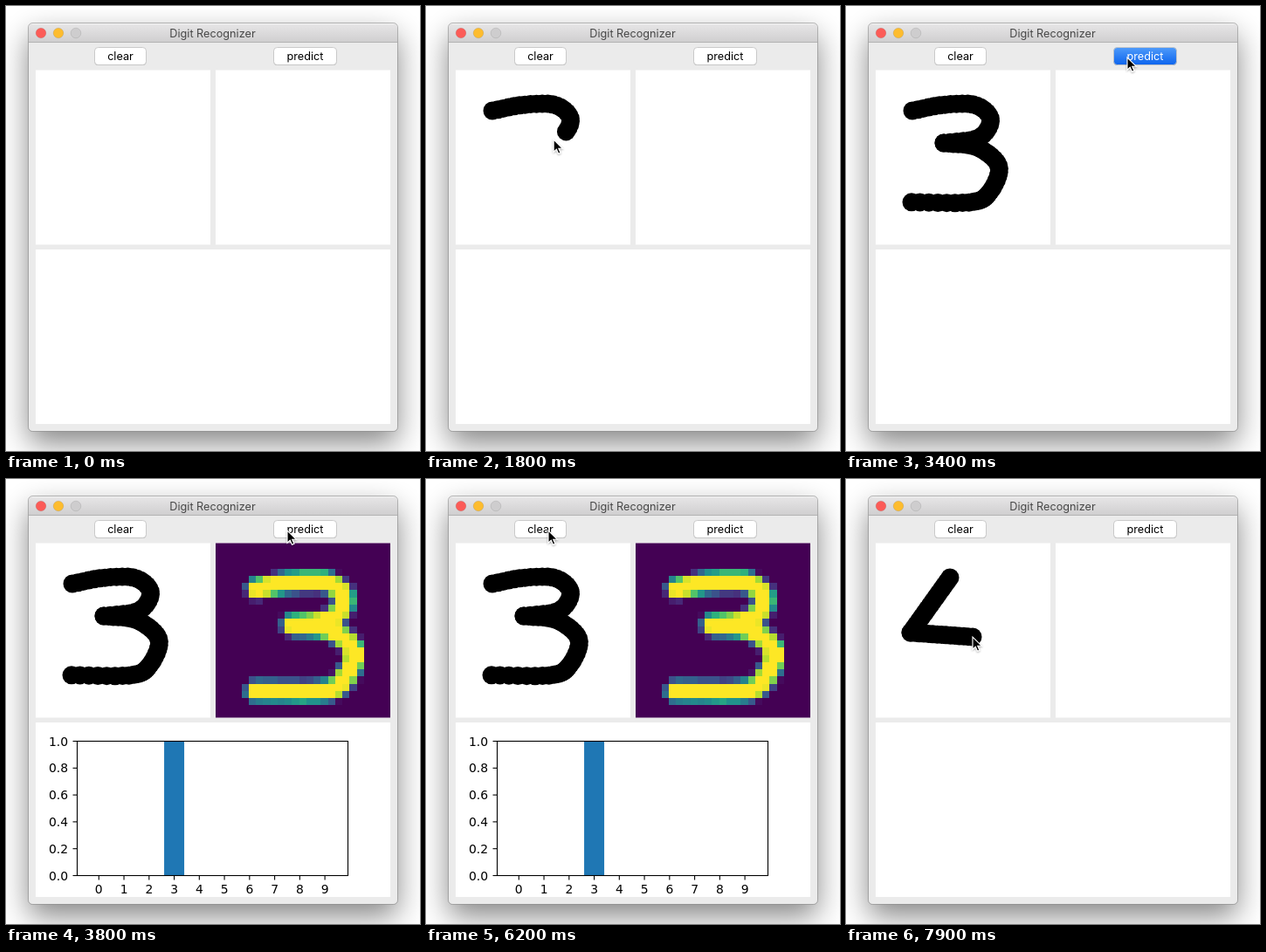
An HTML page for the animation above (8000 ms loop, 474 by 510 pixels).

```html
<!DOCTYPE html>
<html lang="en">
<head>
<meta charset="utf-8">
<title>Digit Recognizer</title>
<style>
  html, body { margin: 0; width: 100%; height: 100%; overflow: hidden; background: #fff; }
  svg { display: block; width: 474px; height: 510px; }
  .ui { font: 12.7px Inter, Roboto, sans-serif; text-anchor: middle; }
  .axis { font: 13.9px "DejaVu Sans", sans-serif; }
</style>
</head>
<body>
<svg id="stage" viewBox="0 0 474 510" xmlns="http://www.w3.org/2000/svg">
  <defs>
    <linearGradient id="bar" x2="0" y2="1">
      <stop offset="0" stop-color="#e7e6e7"/><stop offset="1" stop-color="#d0cfd0"/>
    </linearGradient>
    <linearGradient id="blue" x2="0" y2="1">
      <stop offset="0" stop-color="#4f9bfa"/><stop offset="1" stop-color="#0c64ee"/>
    </linearGradient>
    <filter id="blur" x="-30%" y="-30%" width="160%" height="160%">
      <feGaussianBlur stdDeviation="17"/>
    </filter>
    <filter id="soft" x="-50%" y="-50%" width="200%" height="200%">
      <feDropShadow dx="0" dy="1" stdDeviation="0.8" flood-opacity="0.35"/>
    </filter>
    <clipPath id="imageClip"><rect x="240" y="73.4" width="200" height="200"/></clipPath>
  </defs>

  <rect width="474" height="510" fill="#fff"/>
  <rect x="26" y="34" width="422" height="467" rx="5" opacity="0.48" filter="url(#blur)"/>
  <rect x="25.5" y="19.5" width="423" height="468" rx="5" fill="#ebebeb" stroke="#000" stroke-opacity="0.25"/>
  <path d="M26 41V25a5 5 0 0 1 5-5h412a5 5 0 0 1 5 5V41z" fill="url(#bar)"/>
  <path d="M30 20.5H444" stroke="#f4f4f4"/>
  <path d="M26 41.5H448" stroke="#b3b3b3"/>
  <g stroke="#000" stroke-opacity="0.12" stroke-width="0.8">
    <circle cx="40" cy="31" r="5.8" fill="#fc5b57"/>
    <circle cx="60" cy="31" r="5.8" fill="#fdbc2e"/>
    <circle cx="80" cy="31" r="5.8" fill="#cecdce"/>
  </g>
  <text class="ui" x="236.5" y="36" fill="#474747">Digit Recognizer</text>

  <g id="buttons"></g>
  <path d="M34 73.4h200v200h-200zM240 73.4h200v200h-200zM34 279h406v200h-406z" fill="#fff"/>
  <g id="ink"></g>
  <g id="result">
    <g id="image" clip-path="url(#imageClip)"></g>
    <g id="chart" class="axis"></g>
  </g>
  <path id="cursor" d="M0 0V14.2L3.3 11.1 5.5 16.2 7.9 15.2 5.7 10.2H10.2Z" fill="#000"
        stroke="#fff" stroke-width="1.1" filter="url(#soft)"/>
</svg>
<script>
const LOOP = 8000, STEP = 100;
const RADIUS = 10.5, STAMP_MS = 14, LEAD = 35;
const PRESS_PREDICT = 3200, SHOW = 3800, PRESS_CLEAR = 6700, CLEAR = 6800;
const $ = id => document.getElementById(id);

function add(parent, tag, attrs, text) {
  const node = document.createElementNS("http://www.w3.org/2000/svg", tag);
  for (const key in attrs) node.setAttribute(key, attrs[key]);
  if (text !== undefined) node.textContent = text;
  parent.appendChild(node);
  return node;
}

const linear = k => k;
const easeInOut = k => k < 0.5 ? 4 * k ** 3 : 1 - 4 * (1 - k) ** 3;
const move = (start, end, points, ease = linear) => ({ start, end, points, ease });

// Catmull-Rom curve through the points, k from 0 to 1.
function spline(points, k) {
  const last = points.length - 1;
  const i = Math.min(Math.floor(k * last), last - 1), u = k * last - i;
  const b = points[i], c = points[i + 1];
  return b.map((_, n) => {
    const a = i > 0 ? points[i - 1][n] : 2 * b[n] - c[n];
    const d = i + 2 <= last ? points[i + 2][n] : 2 * c[n] - b[n];
    return b[n] + u / 2 * (c[n] - a + u * (2 * a - 5 * b[n] + 4 * c[n] - d + u * (3 * (b[n] - c[n]) + d - a)));
  });
}

function position({ start, end, points, ease }, t) {
  const k = Math.min(Math.max((t - start) / (end - start), 0), 1);
  return spline(points, ease(k));
}

const three = [
  move(1500, 1900, [[76, 120], [112, 113.3], [148, 113.5], [165.5, 130], [152, 151], [112, 157]]),
  move(1900, 2400, [[112, 157], [150, 162], [175, 184], [164, 214], [142, 225], [75, 224.8]])
];
const four = [
  move(7500, 7700, [[119, 113], [74, 176]]),
  move(7700, 7900, [[74, 176], [145, 181]])
];
const early = m => ({ ...m, start: m.start - LEAD, end: m.end - LEAD });
const trips = [
  move(800, 1300, [[388, 340], [76, 120]], easeInOut),
  ...three.map(early),
  move(2480, 3000, [[75, 224], [322, 59]], easeInOut),
  move(5300, 6200, [[322, 59], [372, 160], [196, 284], [62, 130], [140, 59]]),
  move(6850, 7450, [[140, 59], [119, 113]], easeInOut),
  ...four
];

function stamps(stroke) {
  const span = stroke.end - stroke.start, n = Math.round(span / STAMP_MS);
  return Array.from({ length: n + 1 }, (_, i) => {
    const time = stroke.start + span * i / n;
    const [x, y] = position(stroke, time);
    return { time, x, y };
  });
}

const threeDots = three.flatMap(stamps);
const drawInk = (dots, end) => dots.map(({ time, x, y }) =>
  ({ start: time, end, node: add($("ink"), "circle", { cx: x, cy: y, r: RADIUS }) }));
const ink = [...drawInk(threeDots, CLEAR), ...drawInk(four.flatMap(stamps), LOOP)];

function makeButton(label, x, width) {
  const y = 47.5, height = 20, g = $("buttons");
  add(g, "rect", { x, y: y + 0.6, width, height, rx: 4, fill: "#b0b0b0" });
  const face = add(g, "rect", { x, y, width, height, rx: 4, stroke: "#c6c6c6", "stroke-width": 0.9 });
  const text = add(g, "text", { class: "ui", x: x + width / 2, y: 62 }, label);
  return pressed => {
    face.setAttribute("fill", pressed ? "url(#blue)" : "#fff");
    text.setAttribute("fill", pressed ? "#fff" : "#000");
  };
}
const pressClear = makeButton("clear", 101.5, 59);
const pressPredict = makeButton("predict", 306.5, 72);

const viridis = ["440154", "472d7b", "3b528b", "2c728e", "21918c", "28ae80", "5ec962", "addc30", "fde725"]
  .map(hex => [0, 2, 4].map(i => parseInt(hex.slice(i, i + 2), 16)));

function heat(v) {
  const p = v * (viridis.length - 1), i = Math.min(Math.floor(p), viridis.length - 2);
  return `rgb(${viridis[i].map((c, k) => Math.round(c + (viridis[i + 1][k] - c) * (p - i)))})`;
}

// The drawing, averaged down to 28 by 28 cells.
function drawImage() {
  const g = $("image"), cell = 8.25, src = 206 / 28, sub = 6;
  const inked = (x, y) => threeDots.some(d => Math.hypot(d.x - x, d.y - y) < RADIUS);
  add(g, "rect", { x: 240, y: 73, width: 200, height: 201, fill: heat(0) });
  const cells = add(g, "g", { "shape-rendering": "crispEdges" });
  for (let row = 0; row < 28; row++) {
    for (let col = 0; col < 28; col++) {
      let hits = 0;
      for (let s = 0; s < sub * sub; s++) {
        const u = (s % sub + 0.5) / sub, v = (Math.floor(s / sub) + 0.5) / sub;
        if (inked(31 + (col + u) * src, 70 + (row + v) * src)) hits++;
      }
      if (hits) add(cells, "rect", {
        x: 236.6 + col * cell, y: 69.6 + row * cell, width: cell, height: cell, fill: heat(hits / (sub * sub))
      });
    }
  }
}

function drawChart() {
  const g = $("chart"), left = 81.5, top = 300.5, width = 310, height = 154;
  const bottom = top + height, unit = width / 10.78;
  const line = { stroke: "#000", "stroke-width": 1.1, fill: "none" };
  const center = n => left - 0.8 + (n + 0.89) * unit;
  add(g, "rect", { x: center(3) - 0.4 * unit, y: top, width: 0.8 * unit, height, fill: "#1f77b4" });
  add(g, "rect", { x: left, y: top, width, height, ...line });
  for (let n = 0; n < 10; n++) {
    add(g, "path", { d: `M${center(n)} ${bottom}v5`, ...line });
    add(g, "text", { x: center(n), y: 475, "text-anchor": "middle" }, n);
  }
  for (let n = 0; n <= 5; n++) {
    const y = bottom - height * n / 5;
    add(g, "path", { d: `M${left} ${y}h-5`, ...line });
    add(g, "text", { x: 71, y: y + 5, "text-anchor": "end" }, (n / 5).toFixed(1));
  }
}

const show = (node, on) => node.setAttribute("visibility", on ? "visible" : "hidden");

function render(time) {
  const t = Math.floor(time % LOOP / STEP) * STEP;
  for (const dot of ink) show(dot.node, t >= dot.start && t < dot.end);
  show($("result"), t >= SHOW && t < CLEAR);
  pressPredict(t >= PRESS_PREDICT && t < SHOW);
  pressClear(t >= PRESS_CLEAR && t < CLEAR);

  const trip = trips.filter(m => m.start <= t).pop();
  show($("cursor"), trip);
  if (trip) $("cursor").setAttribute("transform", `translate(${position(trip, t)})`);
}

drawImage();
drawChart();
const begin = performance.now();
function tick() {
  render(performance.now() - begin);
  requestAnimationFrame(tick);
}
tick();
</script>
</body>
</html>
```
